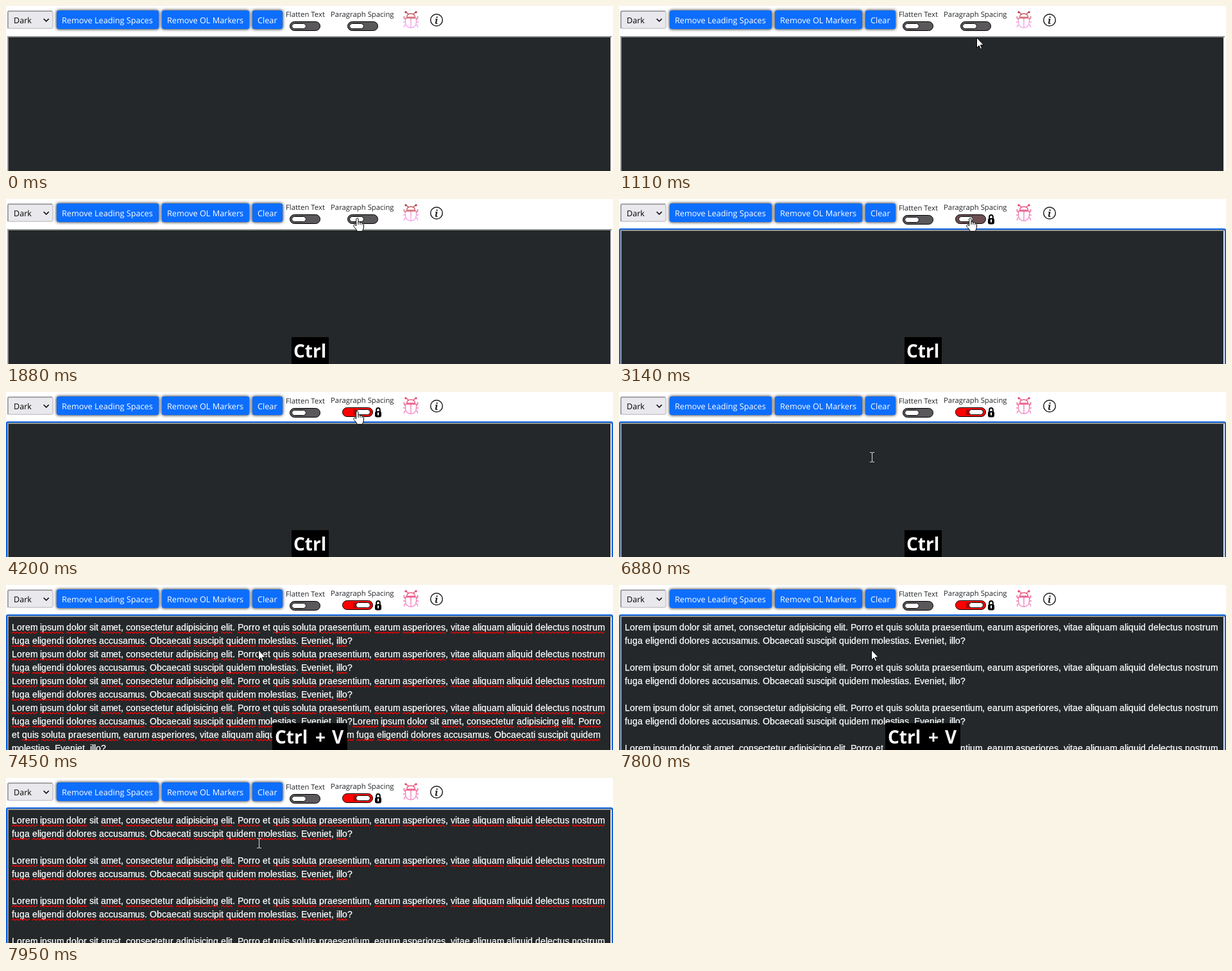
An HTML page with a canvas that plays this animation: 946x258 px, repeating every 8 s.

```html
<!DOCTYPE html>
<html lang="en">
<head>
<meta charset="utf-8">
<title>Text formatter</title>
<style>
html, body { margin: 0; width: 100%; height: 100%; overflow: hidden; background: #fff; }
canvas { display: block; }
</style>
</head>
<body>
<canvas id="stage" width="946" height="258"></canvas>
<script>
const ctx = document.getElementById('stage').getContext('2d');
const W = 946, H = 258, LOOP = 8000;
const UI = '"Open Sans", "Noto Sans", sans-serif';
const BODY = '14px "Liberation Sans", Arial, sans-serif';
const CLICK = 3070;
const STEP = 51.3;

const PARA = 'Lorem ipsum dolor sit amet, consectetur adipisicing elit. ' +
  'Porro et quis soluta praesentium, earum asperiores, vitae aliquam aliquid ' +
  'delectus nostrum fuga eligendi dolores accusamus. Obcaecati suscipit quidem ' +
  'molestias. Eveniet, illo?';
const PASTED = [PARA, PARA, PARA, PARA + PARA];
const SPACED = [PARA, '', PARA, '', PARA, '', PARA + PARA];
const KNOWN_WORDS = ['sit', 'et'];

const ARROW = new Path2D('M.5 .5V16.3L4.1 12.9L6.4 18.3L8.7 17.3L6.4 12H11.4Z');
const HAND = new Path2D('M4.7 2Q6.3-.6 8 2V7Q10 5.8 11 7.8Q13 6.8 14 8.8Q16.3 8.4 16.5 10.6' +
  'V15Q16 18 14.4 21.4H6.6Q5 18 1.3 14.6Q-.2 12 1.8 11.3Q3.4 11.2 4.7 13Z');
const HAND_LINES = new Path2D('M8 7V11M11 8V11M14 9V11.5');

const clamp = p => Math.max(0, Math.min(1, p));
const smooth = p => p * p * (3 - 2 * p);
const mix = (a, b, p) => a + (b - a) * p;
const within = (t, a, b) => t >= a && t < b;

function text(str, x, y, font, color) {
  ctx.font = font;
  ctx.fillStyle = color;
  ctx.fillText(str, x, y);
}

function rect(x, y, w, h, color) {
  ctx.fillStyle = color;
  ctx.fillRect(x, y, w, h);
}

function pill(x, y, w, h, r, fill, stroke) {
  ctx.beginPath();
  ctx.roundRect(x, y, w, h, r);
  ctx.fillStyle = fill;
  ctx.fill();
  if (stroke) {
    ctx.strokeStyle = stroke;
    ctx.lineWidth = 1;
    ctx.stroke();
  }
}

function line(d, color, width) {
  ctx.strokeStyle = color;
  ctx.lineWidth = width;
  ctx.stroke(new Path2D(d));
}

function button(label, x, w) {
  ctx.save();
  ctx.shadowColor = '#000';
  ctx.shadowBlur = 5;
  pill(x, 7, w, 29, 3, '#0d6efd');
  ctx.restore();
  text(label, x + 8, 27, '12.7px ' + UI, '#fff');
}

function select() {
  pill(2, 7, 72, 29, 4, '#d2d2d6');
  line('M3 35V10Q3 8 5 8H72', '#a3a3a8', 2);
  pill(4, 9, 68, 25, 2, '#e9e9ed');
  text('Dark', 12, 27, '12.6px ' + UI, '#000');
  line('M58.7 20L62.7 24L66.7 20', '#000', 1.6);
}

function toggle(x, y, p) {
  const fill = `rgb(${mix(90, 255, p)},${mix(88, 0, p)},${mix(91, 0, p)})`;
  pill(x + .5, y + .5, 47, 14, 7, fill, '#000');
  if (p === 1) rect(x + 17, y + 3, 5, 9, '#b40000');
  pill(x + mix(4, 22, p) - .5, y + 3.5, 22, 8, 4, '#fff', '#000');
}

function lock() {
  line('M577.2 32V28Q577.2 25 580 25T582.8 28V32', '#000', 2);
  pill(575, 30, 10, 9.5, 3, '#000');
  rect(579, 32, 2, 4.5, '#fff');
}

function bug(on) {
  const shade = ctx.createLinearGradient(0, 8, 0, 35);
  shade.addColorStop(0, on ? '#e8456a' : '#a93a3d');
  shade.addColorStop(.4, on ? '#ee6595' : '#d97886');
  shade.addColorStop(.55, on ? '#f27db5' : '#f49ade');
  shade.addColorStop(1, on ? '#f58ccc' : '#f6a6f0');
  line('M624.5 17.5Q625 12 631 12T637.5 17.5ZM622.5 19H639.5V25Q639 34 631 34T622.5 25Z' +
    'M631 19V34M627 12.5L624 10M635 12.5L638 10' +
    'M622.5 21Q619.5 20 620.5 16M639.5 21Q642.5 20 641.5 16' +
    'M619 25H622.5M639.5 25H643M623.5 29Q620 30 620.5 33.5M638.5 29Q642 30 641.5 33.5', shade, 1.4);
  ctx.fillStyle = shade;
  for (const x of [623, 639]) {
    ctx.beginPath();
    ctx.arc(x, 9.7, 1.7, 0, 7);
    ctx.fill();
  }
}

function info() {
  ctx.beginPath();
  ctx.arc(671, 22, 9.3, 0, 7);
  ctx.strokeStyle = '#222';
  ctx.lineWidth = 1.5;
  ctx.stroke();
  text('i', 668, 27.5, 'italic bold 15px "Noto Serif", serif', '#222');
}

function toolbar(t) {
  const on = t >= CLICK;
  select();
  button('Remove Leading Spaces', 79, 159);
  button('Remove OL Markers', 243, 136);
  button('Clear', 384, 47);
  const small = '11.35px ' + UI, drop = on ? 1 : 0;
  text('Flatten Text', 436, 17 + drop, small, '#212529');
  toggle(442, 24 + drop, 0);
  text('Paragraph Spacing', 506, 17, small, '#212529');
  toggle(on ? 524 : 532, 24, smooth(clamp((t - CLICK) / 340)));
  if (on) lock();
  bug(on);
  info();
}

function editor(t) {
  const top = t >= CLICK ? 48 : 47;
  if (t >= CLICK + 50) pill(0, top - 2, W, H, 3, '#0a62dc');
  rect(2, top, 942, H, '#ededed');
  rect(2, top, 940, H, '#979797');
  rect(942, top, 2, 2, '#979797');
  rect(4, top + 2, 938, H, '#24282a');
}

// Body text uses hinted, whole-pixel advances; the widest glyphs take 11 px.
const advance = ch => Math.min(11, Math.round(ctx.measureText(ch).width));
const widthOf = str => [...str].reduce((sum, ch) => sum + advance(ch), 0);

function bodyText(str, x, y) {
  ctx.fillStyle = ctx.strokeStyle = '#fff';
  ctx.lineWidth = .25;
  for (const ch of str) {
    ctx.fillText(ch, x, y);
    ctx.strokeText(ch, x, y);
    x += advance(ch);
  }
}

function wrap(paras) {
  const rows = [];
  for (const para of paras) {
    let row = '';
    for (const word of para.split(' ')) {
      const longer = row ? row + ' ' + word : word;
      if (row && widthOf(longer) > 929) {
        rows.push(row);
        row = word;
      } else row = longer;
    }
    rows.push(row);
  }
  return rows;
}

function squiggle(x, y, w) {
  ctx.save();
  ctx.beginPath();
  ctx.rect(x, y - 1, w, 5);
  ctx.clip();
  ctx.beginPath();
  ctx.moveTo(x, y + 2);
  for (let d = 0; d < w; d += 6) {
    ctx.lineTo(x + d + 2, y);
    ctx.lineTo(x + d + 3, y);
    ctx.lineTo(x + d + 5, y + 2);
    ctx.lineTo(x + d + 6, y + 2);
  }
  ctx.strokeStyle = '#f00';
  ctx.lineWidth = 1.2;
  ctx.stroke();
  ctx.restore();
}

function writing(paras, checked) {
  ctx.font = BODY;
  wrap(paras).forEach((row, i) => {
    const y = 71 + i * 21;
    if (y > H + 16) return;
    bodyText(row, 9, y);
    if (!checked) return;
    for (const m of row.matchAll(/\w+/g)) {
      if (KNOWN_WORDS.includes(m[0])) continue;
      squiggle(9 + widthOf(row.slice(0, m.index)), y + 2.5, widthOf(m[0]));
    }
  });
}

function caret(t) {
  const shown = [[3180, 3710], [4250, 4770], [5330, 5830], [6370, 6880]];
  if (shown.some(([a, b]) => within(t, a, b))) rect(9, 58, 1, 16, '#fff');
  if (within(t, 7080, 7450)) rect(156, 247, 1, 16, '#fff');
}

function keys(t) {
  const bold = 'bold 28px ' + UI;
  if (within(t, 7080, 7850)) {
    rect(415, 216, 117, 42, '#000');
    text('Ctrl', 419, 248, bold, '#fff');
    text('+', 482, 248, bold, '#fff');
    text('V', 508, 248, bold, '#fff');
  } else if (within(t, 1880, 4350) || within(t, 6680, 7080) || within(t, 7850, 7950)) {
    rect(445, 216, 58, 42, '#000');
    text('Ctrl', 448, 248, bold, '#fff');
  }
}

function pointer(shape, x, y) {
  ctx.save();
  ctx.translate(Math.round(x), Math.round(y));
  if (shape === 'beam') {
    line('M-3 -7.5H-1Q.5 -7.5 .5 -6V6Q.5 7.5 -1 7.5H-3M4 -7.5H2Q.5 -7.5 .5 -6M.5 6Q.5 7.5 2 7.5H4', '#dcdcdc', 1);
  } else {
    const path = shape === 'hand' ? HAND : ARROW;
    if (shape === 'hand') ctx.translate(-6, 0);
    ctx.fillStyle = '#fff';
    ctx.fill(path);
    ctx.strokeStyle = '#000';
    ctx.lineWidth = 1;
    ctx.stroke(path);
    if (shape === 'hand') ctx.stroke(HAND_LINES);
  }
  ctx.restore();
}

function cursor(t) {
  if (t < 460) return;
  if (t < 1280) {
    const p = Math.floor((t - 460) / STEP + .01) / 15;
    const e = 1 - (1 - clamp(p)) ** 2;
    pointer('arrow', mix(897, 543, e), mix(246, 41, e));
  } else if (t < 1730) {
    const spots = [[538, 35], [541, 29], [544, 26], [545, 25]];
    const [x, y] = spots[Math.min(3, Math.floor((t - 1280) / 50))];
    pointer('arrow', t < 1580 ? x : 546, y);
  } else if (t < 1780) {
    pointer('arrow', 546, 27);
  } else if (t < 4250) {
    pointer('hand', 547, 29);
  } else if (t < 5020) {
    const e = smooth(clamp((Math.floor((t - 4250) / STEP + .01) + 1) / 15));
    const x = mix(547, 402, e), y = mix(29, 101, e);
    pointer(y < 41 ? 'hand' : y < 47 ? 'arrow' : 'beam', x, y);
  } else if (within(t, 7080, 7900)) {
    pointer('arrow', 393, 101);
  } else {
    pointer('beam', 394, 102);
  }
}

function draw(t) {
  ctx.lineJoin = 'round';
  rect(0, 0, W, H, '#fff');
  ctx.textRendering = 'geometricPrecision';
  toolbar(t);
  editor(t);
  ctx.textRendering = 'auto';
  if (t >= 7800) writing(SPACED, t >= 7900);
  else if (t >= 7080) writing(PASTED, t >= 7180);
  caret(t);
  keys(t);
  cursor(t);
}

const start = performance.now();
function tick() {
  draw((performance.now() - start) % LOOP);
  requestAnimationFrame(tick);
}
tick();
</script>
</body>
</html>
```
